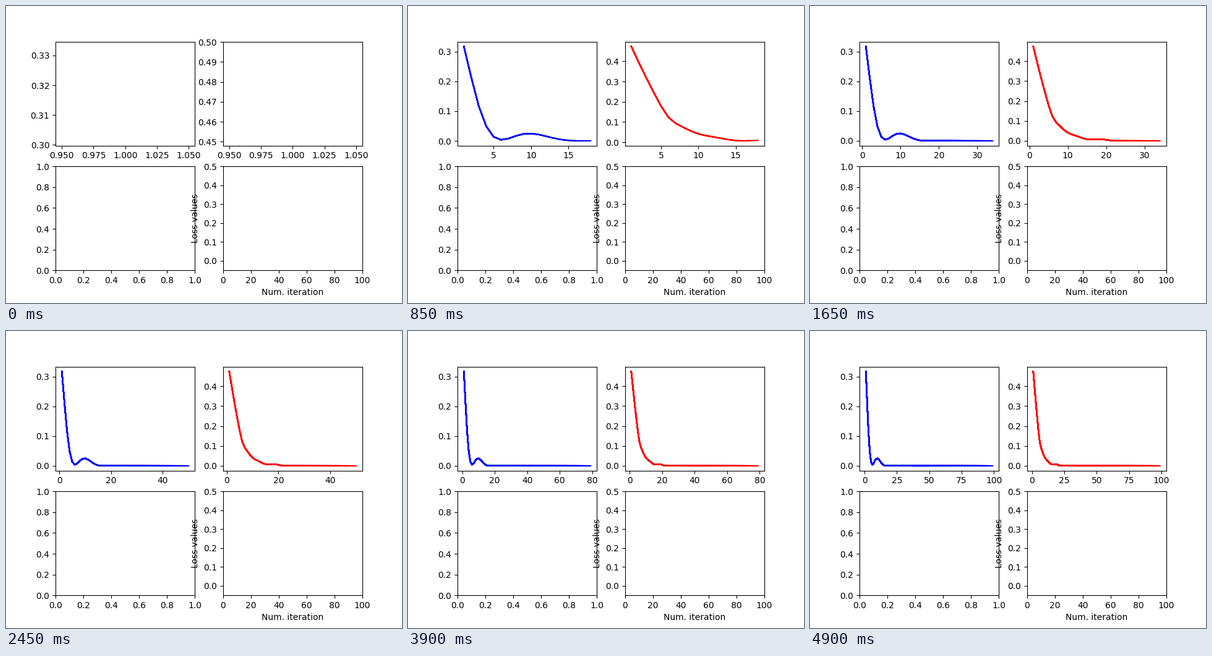
A matplotlib script for the animation above (4950 ms loop, 640 by 480 pixels).

```python
import numpy as np
import matplotlib.pyplot as plt
from matplotlib.animation import FuncAnimation

STEPS = 99
INTERVAL = 50

n = np.arange(1, STEPS + 1)


def bump(height, centre, width):
    return height * np.exp(-((n - centre) / width) ** 2)


def left_loss():
    """A damped oscillation, squared, over a quickly fading floor."""
    swing = np.sin(np.pi * (n - 6) / 10.5) ** 2
    floor = 0.012 * np.exp(-(n - 1) / 4.5)
    return 0.3069 * np.exp(-0.27 * (n - 1)) * swing + floor


def right_loss():
    """A sigmoid descent with a slight ripple."""
    descent = 0.8851 / (1 + np.exp((n - 1.4) / 2.8))
    ripple = bump(-0.021, 6, 1.5) + bump(0.0065, 12.2, 2) + bump(0.007, 18.5, 2)
    return descent + ripple


def growing_lines(ax, values, color):
    """One line per iteration; earlier ones stay under the later ones."""
    return [ax.plot(n[:k], values[:k], color)[0] for k in n]


fig, axes = plt.subplots(2, 2, figsize=(6.4, 4.8), dpi=100)
(ax_left, ax_right), (_, ax_loss) = axes

ax_loss.set_xlim(0, 100)
ax_loss.set_ylim(-0.05, 0.5)
ax_loss.set_xlabel("Num. iteration")
ax_loss.set_ylabel("Loss values")

curves = [
    (ax_left, growing_lines(ax_left, left_loss(), "b")),
    (ax_right, growing_lines(ax_right, right_loss(), "r")),
]


def update(i):
    for ax, lines in curves:
        for k, line in enumerate(lines):
            line.set_visible(k <= i)
        ax.relim(visible_only=True)
        ax.autoscale_view()
    return []


def init():
    return update(0)


anim = FuncAnimation(fig, update, frames=STEPS, init_func=init,
                     interval=INTERVAL, repeat=True, repeat_delay=0)
plt.show()
```
